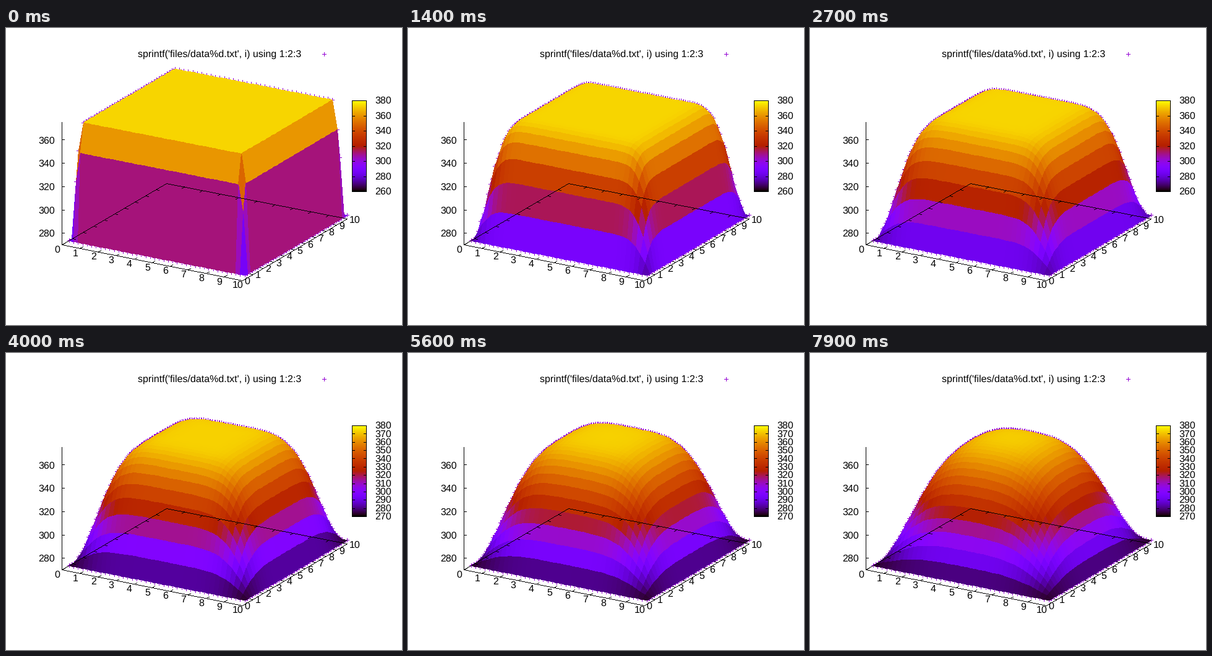
Animation of 640x480 px, one loop 8 s. Source, as a matplotlib script:

```python
import numpy as np
import matplotlib.pyplot as plt
from matplotlib.animation import FuncAnimation
from matplotlib.collections import LineCollection, PolyCollection

W, H, DPI = 640, 480, 100
FRAMES, INTERVAL = 80, 100
N = 40
COLD, HOT = 273.0, 373.0
PX = 72 / DPI
PURPLE = "#9400d3"
BAR = (559, 582, 117, 264)  # left, right, top, bottom

plt.rcParams["font.family"] = "Liberation Sans"
plt.rcParams["font.size"] = 16 * PX
plt.rcParams["text.hinting"] = "none"


def project(x, y, z=270.0):
    """Oblique view of the box, in pixels from the top left."""
    sx = 90.2 + 29.13 * x + 16.9 * y
    sy = 350.2 + 5.73 * x - 9.95 * y - 1.886 * (z - 270)
    return np.stack(np.broadcast_arrays(sx, sy), axis=-1)


def snap(p):
    return np.floor(np.asarray(p) + 0.5)


def palette(g):
    """Black, violet, red, yellow: sqrt(g), g^3, sin(2 pi g)."""
    g = np.clip(g, 0, 1)
    rgb = np.stack([np.sqrt(g), g ** 3, np.sin(2 * np.pi * g)], axis=-1)
    return np.clip(rgb, 0, 1)


def diffuse(t):
    """One explicit heat step: each inner cell becomes its neighbours' mean."""
    new = t.copy()
    new[1:-1, 1:-1] = (t[2:, 1:-1] + t[:-2, 1:-1]
                       + t[1:-1, 2:] + t[1:-1, :-2]) / 4
    return new


def row(x, y, before, after):
    """Horizontal one pixel strokes around the given pixels."""
    return np.stack([np.stack([x - before, y + 0.5], -1),
                     np.stack([x + after, y + 0.5], -1)], axis=1)


def plus_marks(p):
    """Seven pixel wide plus signs centred on the given pixels."""
    x, y = snap(p).reshape(-1, 2).T
    down = row(y, x, 3, 4)[:, :, ::-1]
    return np.concatenate([row(x, y, 3, 4), down])


def pixel_line(a, b):
    """Stepped line between two pixels, without smoothing."""
    a, b = snap(a), snap(b)
    n = int(np.abs(b - a).max()) + 1
    x, y = snap(np.linspace(a, b, n)).T
    return row(x, y, 0, 1)


def strokes(segs, color="black", z=3):
    lc = LineCollection(segs, colors=color, linewidths=PX,
                        antialiaseds=False, zorder=z)
    lc.set_snap(False)
    ax.add_collection(lc, autolim=False)
    return lc


def pixel_lines(pairs):
    return np.concatenate([pixel_line(a, b) for a, b in pairs])


def label(x, y, s, ha):
    """Text whose digits are vertically centred on y."""
    return ax.text(x, y + 5.6, s, ha=ha, va="baseline", zorder=4)


# heat field for every frame
plate = np.full((N, N), COLD)
plate[1:-1, 1:-1] = HOT
fields = []
for _ in range(FRAMES):
    plate = diffuse(plate)
    fields.append(plate)

# nodes, with rows running from back to front
gx, gy = np.meshgrid(np.arange(1, N + 1) * 0.25,
                     np.arange(N, 0, -1) * 0.25)

fig = plt.figure(figsize=(W / DPI, H / DPI), dpi=DPI, facecolor="white")
ax = fig.add_axes([0, 0, 1, 1])
ax.axis("off")

# colour box
left, right, top, bottom = BAR
ramp = palette(np.linspace(1, 0, bottom - top))[:, None, :]
ax.imshow(ramp, extent=(left, right, bottom, top), aspect="auto",
          interpolation="nearest", zorder=1)
ax.set_xlim(0, W)
ax.set_ylim(H, 0)
bar_ticks = strokes([])
bar_labels = [label(596, 0, "", "left") for _ in range(12)]

# frames of the colour box and the base, and the vertical axis
box = [(left, top), (right, top), (right, bottom), (left, bottom)]
base = project(np.array([0, 10, 10, 0]), np.array([0, 0, 10, 10]))
frame = [(c[i], c[(i + 1) % 4]) for c in (box, base) for i in range(4)]
frame.append((base[0], (base[0][0], 152)))

# axis ticks and labels
along_x = np.array([4.3, -2.5])
along_y = np.array([4.9, 1.0])
for k in range(11):
    front, back = project(k, 0), project(k, 10)
    near, far = project(10, k), project(0, k)
    frame += [(front, front + along_x), (back, back - along_x),
              (near, near - along_y), (far, far + along_y)]
    label(front[0] - 7.3, front[1] + 7, str(k), "center")
    label(near[0] + 4.2, near[1] + 1.2, str(k), "left")
for z in range(280, 361, 20):
    x, y = project(0, 0, z)
    frame.append(((x, y), (x + 4, y)))
    label(79, y + 0.3, str(z), "right")
strokes(pixel_lines(frame))

# key
label(477.5, 40.6, "sprintf('files/data%d.txt', i) using 1:2:3", "right")
strokes(plus_marks([[514, 42]]), PURPLE)

# data points lie under the surface
points = strokes([], PURPLE, z=1)
surface = PolyCollection([], antialiaseds=False, edgecolors="none",
                         linewidths=0, zorder=2)
surface.set_snap(False)
ax.add_collection(surface, autolim=False)


def update(i):
    temp = fields[i]
    p = project(gx, gy, temp)
    points.set_segments(plus_marks(p))

    # the scale tightens once the peak drops at six significant digits
    full = round(temp.max(), 3) >= HOT
    low, step = (260, 20) if full else (270, 10)
    q = snap(p) + 0.5
    quads = np.stack([q[:-1, :-1], q[:-1, 1:], q[1:, 1:], q[1:, :-1]], axis=2)
    mean = (temp[:-1, :-1] + temp[:-1, 1:] + temp[1:, 1:] + temp[1:, :-1]) / 4
    surface.set_verts(quads.reshape(-1, 4, 2))
    surface.set_facecolor(palette((mean.ravel() - low) / (380 - low)))

    values = range(low, 381, step)
    ticks = []
    for k, text in enumerate(bar_labels):
        if k >= len(values):
            text.set_text("")
            continue
        y = bottom - (bottom - top) * (values[k] - low) / (380 - low)
        text.set_text(str(values[k]))
        text.set_y(y + 5)
        ticks += [((left, y), (left + 4, y)), ((right - 4, y), (right, y))]
    bar_ticks.set_segments(pixel_lines(ticks))
    return points, surface, bar_ticks, *bar_labels


anim = FuncAnimation(fig, update, frames=FRAMES, interval=INTERVAL,
                     repeat=True, repeat_delay=0, blit=False)
plt.show()
```
